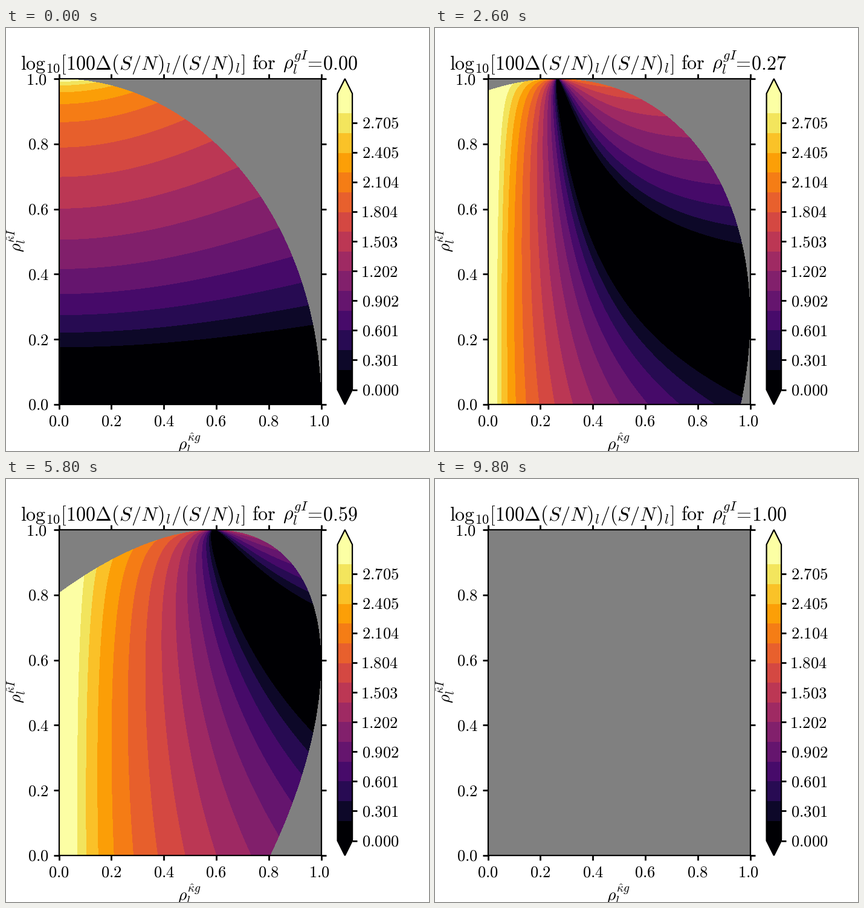
A matplotlib script for the animation above (10000 ms loop, 700 by 700 pixels).

```python
import numpy as np
import matplotlib.pyplot as plt
from matplotlib.animation import FuncAnimation
from matplotlib.patches import Polygon, Rectangle

plt.rcParams["mathtext.fontset"] = "cm"

SIZE, DPI = 700, 200
FRAMES, INTERVAL = 50, 200
LEFT, RIGHT, TOP, BOTTOM = 87.5, 521.5, 84, 623
BAR_L, BAR_R, BAR_T, BAR_B = 548.6, 573.1, 108.5, 598.5
BANDS, V_MAX = 15, 3.0
TICK_LEN = 8.3
LABEL_PT, TITLE_PT = 9.6, 11.55

cmap = plt.get_cmap("inferno", BANDS)
levels = np.linspace(0, V_MAX, 500)
# Colour changes fall on the contour level nearest to each even division
edges = levels[np.round(np.linspace(0, len(levels) - 1, BANDS + 1)).astype(int)]

fig = plt.figure(figsize=(SIZE / DPI, SIZE / DPI), dpi=DPI, facecolor="white")
ax = fig.add_axes([0, 0, 1, 1])

# Plot plane sampled once per screen pixel
cols, rows = 434, 539
X, Y = np.meshgrid((np.arange(cols) + 1) / cols,
                   1 - (np.arange(rows) + 0.5) / rows)


def field(r):
    """Colour map of the relative S/N gain for tracer correlation r."""
    allowed = 1 - X**2 - Y**2 - r**2 + 2 * X * Y * r > 1e-9
    s2 = (X**2 + r**2 - 2 * X * Y * r) / (1 - Y**2)
    gain = np.sqrt(s2 * (1 + X**2) / (X**2 * (1 + s2))) - 1
    value = np.log10(100 * np.maximum(gain, 1e-12))
    rgba = cmap(np.digitize(value, edges[1:-1]), bytes=True)
    rgba[~allowed] = (128, 128, 128, 255)
    return rgba


def bar_y(v):
    return BAR_B - v / V_MAX * (BAR_B - BAR_T)


def label(x, y, s, size=LABEL_PT, ha="left", **kw):
    return ax.text(x, y, f"${s}$", fontsize=size, ha=ha, va="baseline",
                   color="black", zorder=6, **kw)


def tick(x0, y0, x1, y1):
    ax.plot([x0, x1], [y0, y1], color="black", lw=1,
            solid_capstyle="butt", zorder=4)


image = ax.imshow(field(0), extent=(88, 522, BOTTOM, TOP),
                  interpolation="nearest", aspect="auto", zorder=1)
ax.add_patch(Rectangle((LEFT, TOP), RIGHT - LEFT, BOTTOM - TOP, fill=False,
                       ec="black", lw=0.8, zorder=5))

# Axis ticks on all four sides; labels that start with 1 sit further left
for k in range(6):
    x = LEFT + (RIGHT - LEFT) * k / 5
    y = BOTTOM - (BOTTOM - TOP) * k / 5
    tick(x, BOTTOM, x, BOTTOM + TICK_LEN)
    tick(x, TOP, x, TOP - TICK_LEN)
    tick(LEFT, y, LEFT - TICK_LEN, y)
    tick(RIGHT, y, RIGHT + TICK_LEN, y)
    shift = 3 if k == 5 else 0
    text = f"{k / 5:.1f}"
    label(x - shift, 658.5, text, ha="center")
    label(71 - shift, y + 9, text, ha="right")

# Colour bar with pointed ends
mid, tip = (BAR_L + BAR_R) / 2, 24.5
for i, (lo, hi) in enumerate(zip(edges[:-1], edges[1:])):
    ax.add_patch(Rectangle((BAR_L, bar_y(hi)), BAR_R - BAR_L,
                           bar_y(lo) - bar_y(hi),
                           fc=cmap(i), lw=0, antialiased=False, zorder=2))
for y, d, i in ((BAR_T, -tip, BANDS - 1), (BAR_B, tip, 0)):
    ax.add_patch(Polygon([(BAR_L, y), (mid, y + d), (BAR_R, y)],
                         fc=cmap(i), lw=0, antialiased=False, zorder=2))
ax.add_patch(Polygon([(BAR_L, BAR_T), (mid, BAR_T - tip), (BAR_R, BAR_T),
                      (BAR_R, BAR_B), (mid, BAR_B + tip), (BAR_L, BAR_B)],
                     fill=False, ec="black", lw=0.8, zorder=5))
for v in levels[::50]:
    y = bar_y(v)
    tick(BAR_R, y, BAR_R + TICK_LEN, y)
    text = f"{v:.3f}"
    label(587 if text[0] == "1" else 588.8, y + 9, text)

label(284.5, 698, r"\rho_l^{\hat{\kappa} g}", 10)
label(25.5, 371, r"\rho_l^{\hat{\kappa} I}", 10,
      rotation=90, rotation_mode="anchor")

SN = r"(S\hspace{0.03}/N\hspace{0.05})_l"
label(24, 68.5, r"\mathrm{log}_{10}[100\Delta" + SN + "/" + SN + "]", TITLE_PT)
label(407, 68.5, r"\mathrm{for}", TITLE_PT)
label(458, 68.5, r"\rho_l^{gI}", TITLE_PT)
value_text = label(582, 68.5, r"\!=\!0.00", TITLE_PT, ha="right")

ax.set_xlim(0, SIZE)
ax.set_ylim(SIZE, 0)
ax.axis("off")


def update(n):
    r = n / (FRAMES - 1)
    image.set_data(field(r))
    value_text.set_text(rf"$\!=\!{r:.2f}$")
    return image, value_text


anim = FuncAnimation(fig, update, frames=FRAMES, interval=INTERVAL,
                     init_func=lambda: update(0), repeat=True, repeat_delay=0)
plt.show()
```
